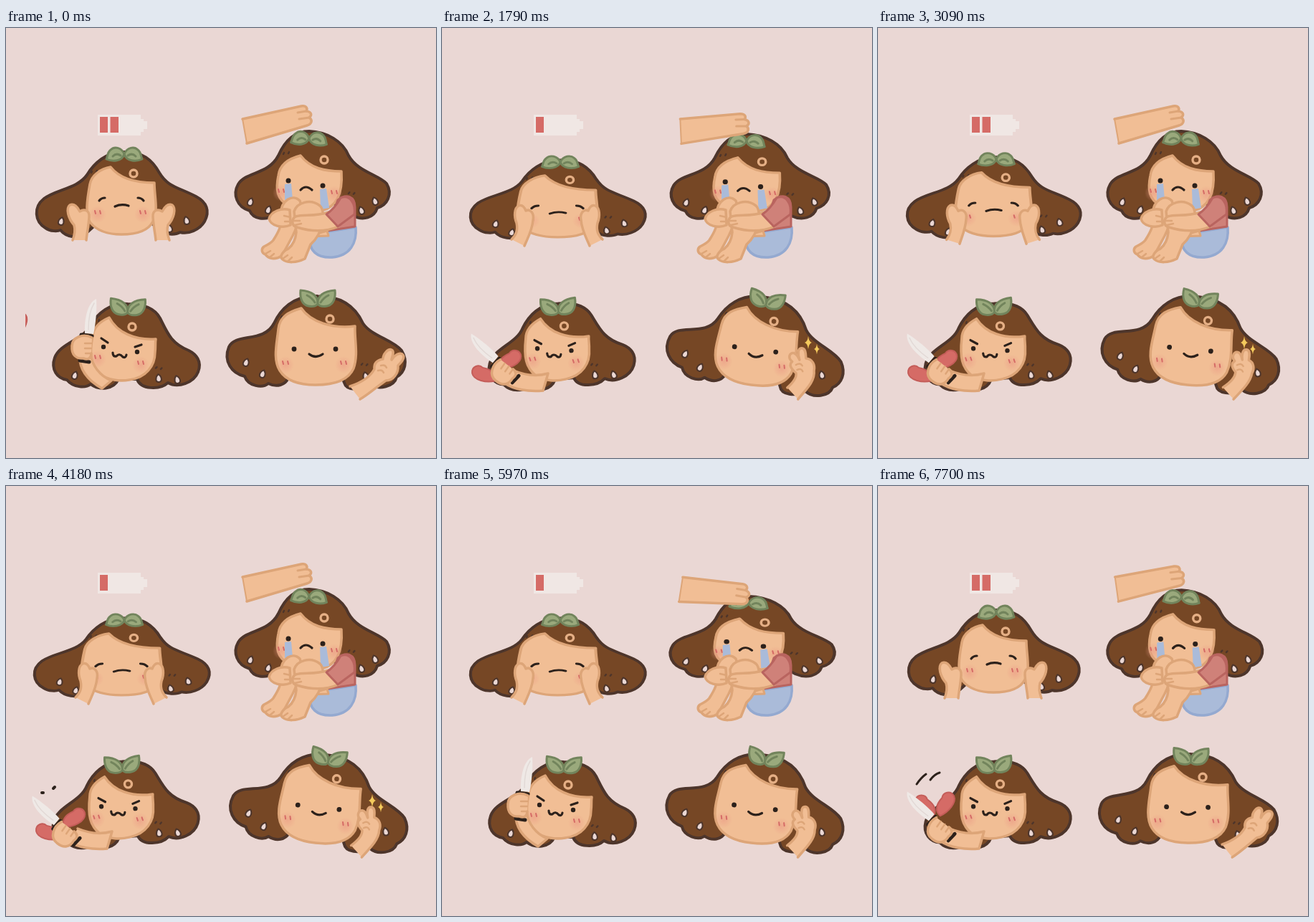
An HTML page with a canvas for the animation above (7760 ms loop, 600x600 px).

```html
<!DOCTYPE html>
<html>
<head>
<meta charset="utf-8">
<title>Four moods</title>
<style>
html, body { margin: 0; width: 100%; height: 100%; overflow: hidden; background: #ead7d4; }
canvas { display: block; }
</style>
</head>
<body>
<canvas id="stage" width="600" height="600"></canvas>
<script>
const LOOP = 7760;
const BG = '#ead7d4', HAIR = '#764725', HAIR_LINE = '#4d352b', SKIN = '#f1be95', SKIN_LINE = '#dda578',
  LEAF = '#9aa97c', LEAF_LINE = '#72845c', INK = '#2c211b', RED = '#d56b66', RED_LINE = '#c45d59',
  SHIRT = '#cf8179', SHIRT_LINE = '#b9645f', BLUE = '#aabbd9', BLUE_LINE = '#94a9d0';
const ctx = document.getElementById('stage').getContext('2d');
ctx.lineCap = ctx.lineJoin = 'round';

const lerp = (a, b, v) => a + (b - a) * v;

// Eased value on a list of time, value pairs
function key(p, ...k) {
  if (p <= k[0]) return k[1];
  for (let i = 2; i < k.length; i += 2) {
    if (p < k[i]) {
      const u = (p - k[i - 2]) / (k[i] - k[i - 2]);
      return lerp(k[i - 1], k[i + 1], u * u * (3 - 2 * u));
    }
  }
  return k[k.length - 1];
}

// Blend two path strings with the same commands
function mix(a, b, v) {
  const n = b.match(/-?[\d.]+/g);
  let i = 0;
  return a.replace(/-?[\d.]+/g, x => lerp(+x, +n[i++], v).toFixed(2));
}

function shape(d, fill, line, w = 3.5) {
  const path = new Path2D(d);
  if (fill) { ctx.fillStyle = fill; ctx.fill(path); }
  if (line) { ctx.strokeStyle = line; ctx.lineWidth = w; ctx.stroke(path); }
}

// Draw around the pivot x, y after moving, turning and scaling it
function pose(x, y, { dx = 0, dy = 0, deg = 0, sx = 1, sy = 1 }, draw) {
  ctx.save();
  ctx.translate(x + dx, y + dy);
  ctx.rotate(deg * Math.PI / 180);
  ctx.scale(sx, sy);
  ctx.translate(-x, -y);
  draw();
  ctx.restore();
}

const place = (x, y, deg, draw) => pose(0, 0, { dx: x, dy: y, deg }, draw);

function dot(x, y, r = 3.2, fill = INK) {
  ctx.fillStyle = fill;
  ctx.beginPath();
  ctx.arc(x, y, r, 0, 7);
  ctx.fill();
}

function curl(x, y) {
  ctx.beginPath();
  ctx.arc(x, y, 5, 0, 7);
  ctx.strokeStyle = '#e5af85';
  ctx.lineWidth = 3.4;
  ctx.stroke();
}

function blush(x, y) {
  const glow = ctx.createRadialGradient(x, y + 3, 0, x, y + 3, 12);
  glow.addColorStop(0, '#eb9a8599');
  glow.addColorStop(1, '#eb9a8500');
  dot(x, y + 3, 12, glow);
  place(x, y, 0, () => shape('M-4 -2L-3 2M3 -2L4 2', null, RED, 2));
}

function gap(x, y, deg) {
  place(x, y, deg, () => shape('M0 -6C5 -2 5 5 0 5C-5 5 -5 -2 0 -6Z', BG, HAIR_LINE, 2));
}

function strands(x, y, deg = 0) {
  place(x, y, deg, () => shape('M-4 1L-3 -1M3 0L4 -2', null, HAIR_LINE, 2.4));
}

function leaves(x, y, droop, deg = 0) {
  const blade = droop
    ? 'M0 2C-4 -8 -14 -9 -19 -4C-24 0 -23 5 -25 9C-16 13 -3 12 0 2Z'
    : 'M0 8C1 -3 -8 -10 -24 -11C-25 -2 -23 9 -13 11C-8 12 -3 12 0 8Z';
  const vein = droop ? 'M-5 4C-9 1 -13 2 -16 5' : 'M-4 6C-7 1 -11 -2 -15 -4';
  place(x, y, deg, () => {
    for (const sx of [1, -1]) pose(0, 0, { sx }, () => {
      shape(blade, LEAF, LEAF_LINE, 3);
      shape(vein, null, LEAF_LINE, 3);
    });
  });
}

function tired(p) {
  const v = key(p, .1, 0, .28, 1, .78, 1, .98, 0);
  shape('M128 121H188V127H192V130H197V141H192V145H188V150H128Z', '#f0e7e4');
  shape('M131 124H142V146H131Z', RED);
  if (p < .27 || p > .82) shape('M145.5 124H157V146H145.5Z', RED);

  const head = { dy: 2 * v, sx: 1 + .025 * v, sy: 1 - .08 * v };
  pose(161, 290, head, () => {
    shape('M165 173C140 172 122 190 113 205C100 224 70 225 53 238C38 250 40 270 55 279C62 284 72 284 76 282C84 292 100 294 110 288L130 270H200L215 282C222 289 236 289 243 285C254 288 270 282 277 270C285 255 280 243 265 235C240 222 226 222 214 202C204 184 190 172 165 173Z', HAIR, HAIR_LINE, 4);
    gap(77, 270, 15); gap(99, 283, 15);
    gap(228, 280, -15); gap(252, 269, -15);
    strands(123, 201); strands(230, 260, 10);
  });
  pose(161, 287, { dy: 4 * v, sx: 1 + .16 * v, sy: 1 - .085 * v }, () => {
    shape('M146 194C132 196 119 206 117 218C113 240 110 262 118 272C128 284 145 288 161 288C180 288 198 284 205 270C213 255 207 235 207 216C185 216 160 212 146 194Z', SKIN, SKIN_LINE);
    pose(0, 0, { dy: 3 * v }, () => {
      blush(128, 257); blush(191, 257);
      shape('M130 241Q133 237 138 237M184 237Q189 237 192 241M152 249Q161 245 171 248', null, INK, 3.2);
    });
  });
  pose(161, 290, head, () => { curl(178, 203); leaves(165, 174, true); });

  const arm = mix(
    'M93 296C96 288 97 282 95 275C87 266 83 252 89 247C95 244 100 250 103 256C109 252 117 254 116 264C115 278 113 286 112 296',
    'M97 295C104 288 106 282 104 272C100 262 101 251 107 248C112 246 115 250 117 255C123 252 129 258 127 268C126 282 120 292 115 304', v);
  shape(arm, SKIN, SKIN_LINE);
  pose(160.5, 0, { sx: -1 }, () => shape(arm, SKIN, SKIN_LINE));
}

function comforted(p) {
  const v = key(p, .08, 0, .48, 1, .54, 1, .76, 0);
  pose(320, 268, { dx: -2 * v, sx: 1 + .07 * v, sy: 1 - .08 * v }, () => {
    shape('M423 144C400 144 388 160 380 178C366 205 335 200 324 218C316 232 322 250 340 255C345 267 362 269 374 261L400 240H450L484 262C498 269 514 265 518 251C532 247 540 232 531 217C520 205 490 200 478 178C470 158 448 145 423 144Z', HAIR, HAIR_LINE, 4);
    gap(341, 243, 20); gap(366, 254, 20);
    gap(496, 255, -20); gap(515, 242, -20);
    strands(391, 175); strands(482, 231, 15);
    shape('M411 178C395 182 382 190 380 206C376 225 378 240 395 248L440 255C462 250 470 230 468 200C445 200 425 196 411 178Z', SKIN, SKIN_LINE);
    blush(384, 227); blush(458, 229);
    curl(444, 184);
    shape('M389 218L398 217L400 240L389 240Z', BLUE);
    shape('M438 225L447 224L451 251L439 253Z', BLUE);
    dot(394, 213, 3.5); dot(442, 220, 3.5);
    shape('M411 226Q418 218 427 226', null, INK, 3.2);
    leaves(423, 152, true, 3);
  });

  shape('M424 288C421 312 435 321 455 320C480 318 490 300 488 278Z', BLUE, BLUE_LINE);
  shape('M463 240C475 230 487 235 487 250V277L448 283Z', SHIRT, SHIRT_LINE, 3);
  shape('M383 260C384 240 400 231 410 241C414 250 410 270 400 290L385 318C375 324 366 322 362 316C356 314 356 308 360 305C366 302 370 300 373 296C380 285 386 275 383 260Z', SKIN, SKIN_LINE);
  shape('M362 315L369 311M368 320L374 315', null, SKIN_LINE, 2.5);
  shape('M448 283L450 290L420 291Z', SKIN, SKIN_LINE, 3);
  shape('M405 285L402 256C406 243 425 238 438 248C446 255 444 285 425 302L417 322C405 328 392 328 386 323C380 319 388 310 394 308C400 303 404 296 405 285Z', SKIN, SKIN_LINE);
  shape('M386 322L393 317M393 326L399 320', null, SKIN_LINE, 2.5);
  shape('M396 254C385 250 370 256 367 266C369 276 385 280 397 275Z', SKIN, SKIN_LINE);
  shape('M450 257C430 264 415 259 404 263C398 267 398 276 406 278C425 284 445 285 464 277Z', SKIN, SKIN_LINE);
  shape('M399 269H410M403 275L412 273M388 262L397 264M389 270H397', null, SKIN_LINE, 2.5);
  shape('M467 237C480 232 488 245 486 260L463 277L447 260C457 253 462 246 467 237Z', SHIRT, SHIRT_LINE, 3);

  pose(332, 145, { deg: 19 * v }, () => {
    shape('M330 127L412 109C420 108 421 113 419 116C427 117 427 122 423 125C428 128 427 134 420 136L336 161', SKIN, SKIN_LINE);
    shape('M330 127L336 161', null, SKIN_LINE, 2);
    shape('M419 116L407 118M423 125L409 127', null, SKIN_LINE, 3);
  });
}

function slicing(p) {
  const v = key(p, .08, 0, .19, 1, .56, 1, .7, 0);
  const push = key(p, .28, 0, .35, 1, .38, 1, .43, 0);
  const head = { deg: -5 * v };
  pose(160, 480, head, () => {
    shape('M170 385C145 383 128 398 118 415C108 435 75 440 68 460C62 477 72 489 85 491C95 503 112 502 118 497C130 506 150 505 157 490H183C188 505 215 505 226 495C240 503 262 495 268 480C274 465 265 455 255 450C230 440 225 425 215 405C207 390 190 385 170 385Z', HAIR, HAIR_LINE, 4);
    gap(96, 485, 20); gap(213, 489, -5); gap(239, 491, -15);
    strands(126, 409); strands(213, 475, 20);
    shape('M144 404C130 410 122 418 121 430C116 455 118 470 130 482C142 492 160 493 172 491C195 488 208 472 208 452C209 445 208 440 209 434C180 436 155 425 144 404Z', SKIN, SKIN_LINE);
    blush(128, 459); blush(188, 467);
    curl(176, 417);
    dot(136, 445); dot(183, 452);
    shape('M133 433L142 439M180 445L189 442M149 453Q149 459 154 458Q158 453 163 459Q167 461 168 456', null, INK, 3.2);
    leaves(170, 389, false, 2);
  });

  const half = 'M-17 8C-18 -4 -8 -8 2 -9C8 -14 18 -9 16 0C13 10 -5 12 -17 8Z';
  ctx.save();
  ctx.beginPath();
  ctx.rect(27, 300, 300, 300);
  ctx.clip();
  if (p < .17) {
    const u = p / .17;
    place(lerp(15, 80, u), lerp(413, 446, u * u), -20 + 40 * u, () =>
      shape('M0 15C-27 -3 -15 -19 0 -9C15 -19 27 -3 0 15Z', RED, RED_LINE, 2));
  } else if (p < .58) {
    const fall = key(p, .21, 0, .36, 1);
    place(lerp(94, 95, fall), lerp(443, 463, fall), lerp(-42, -18, fall), () => shape(half, RED, RED_LINE, 2));
    place(lerp(66, 58, fall), lerp(446, 483, fall), lerp(30, 5, fall), () =>
      pose(0, 0, { sx: -1 }, () => shape(half, RED, RED_LINE, 2)));
  }
  ctx.restore();

  shape(mix(
    'M118 455C120 470 130 485 147 492L134 503C115 492 102 478 103 458',
    'M100 478C112 483 130 487 148 482L141 506C120 508 100 504 88 496', v), SKIN, SKIN_LINE);
  place(lerp(106, 85, v) - 4 * push, lerp(446, 482, v) + 6 * push, -55 * v, () => {
    shape('M4 -20C3 -46 10 -64 20 -68C21 -52 19 -32 16 -19Z', '#efe9e6');
    shape('M9 -25C9 -42 12 -54 17 -62', null, '#e2d9d6', 1.5);
    shape('M-1 -18L14 -16M-3 18L10 20', null, INK, 5);
    shape('M14 -14C2 -20 -14 -15 -14 -2C-15 10 -8 16 2 15C10 18 13 13 13 8', SKIN, SKIN_LINE);
    shape('M13 -6H4M13 1H4M13 8H5', null, SKIN_LINE, 2.4);
  });

  if (p > .15 && p < .28) shape('M54 416Q60 407 67 402M73 410Q79 402 86 400', null, INK, 3);
  if (p > .3 && p < .42) shape('M50 428L52 428M66 422L68 420', null, INK, 4);
}

function sparkle(x, y, s) {
  pose(0, 0, { dx: x, dy: y, sx: s, sy: s }, () =>
    shape('M0 -9Q1 -1 5 0Q1 1 0 9Q-1 1 -5 0Q-1 -1 0 -9Z', '#f4ca5c'));
}

function cheerful(p) {
  const v = key(p, .08, 0, .45, 1, .48, 1, .7, .85, .95, 0);
  pose(431, 495, { deg: 8 * v }, () => {
    shape('M435 374C400 372 382 395 374 412C360 440 320 425 311 445C303 465 315 482 333 486C338 500 358 503 366 496C378 502 390 498 394 488L410 470H462L472 495C475 506 495 507 508 497C520 506 542 500 545 487C557 480 561 465 552 450C540 435 510 430 498 412C488 390 470 374 435 374Z', HAIR, HAIR_LINE, 4);
    gap(335, 467, 20); gap(358, 483, 20);
    gap(528, 472, -20); gap(502, 486, -15);
    strands(388, 403); strands(500, 470, 15);
    shape('M412 391C395 396 382 402 380 420C378 440 372 462 382 478C392 494 412 498 432 498C455 498 477 493 485 475C492 455 486 435 487 416C455 420 425 410 412 391Z', SKIN, SKIN_LINE);
    blush(390, 467); blush(471, 467);
    curl(452, 406);
    dot(402, 448, 3.4); dot(460, 448, 3.4);
    shape('M423 455Q432 462 442 455', null, INK, 3.2);
    leaves(435 + 4 * v, 377, false, 5 * v);
  });
  shape(mix(
    'M480 500C495 495 508 487 514 476C513 466 520 463 526 462C526 455 533 447 538 449C543 452 538 459 538 463C541 458 548 452 553 455C558 459 552 466 547 471C548 482 540 492 530 492C518 500 505 512 494 518',
    'M482 502C488 496 494 488 492 482C484 476 480 470 485 466C477 460 481 453 486 454C491 455 493 460 495 463C492 455 491 446 497 446C503 446 503 455 504 460C514 460 519 468 518 477C521 490 512 500 497 518', v), SKIN, SKIN_LINE);
  shape(mix('M523 471Q529 469 531 474M519 478Q525 476 527 481', 'M491 470Q497 466 500 471M493 477Q499 474 501 479', v), null, SKIN_LINE, 2.4);
  if (p > .4 && p < .85) { sparkle(511, 439, 1); sparkle(523, 448, .8); }
}

function frame(now) {
  const t = now % LOOP;
  const phase = period => t / period % 1;
  ctx.fillStyle = BG;
  ctx.fillRect(0, 0, 600, 600);
  tired(phase(2561));
  comforted(phase(1075));
  slicing(phase(1240));
  cheerful(phase(1116));
  requestAnimationFrame(() => frame(performance.now() - start));
}
const start = performance.now();
frame(0);
</script>
</body>
</html>
```
